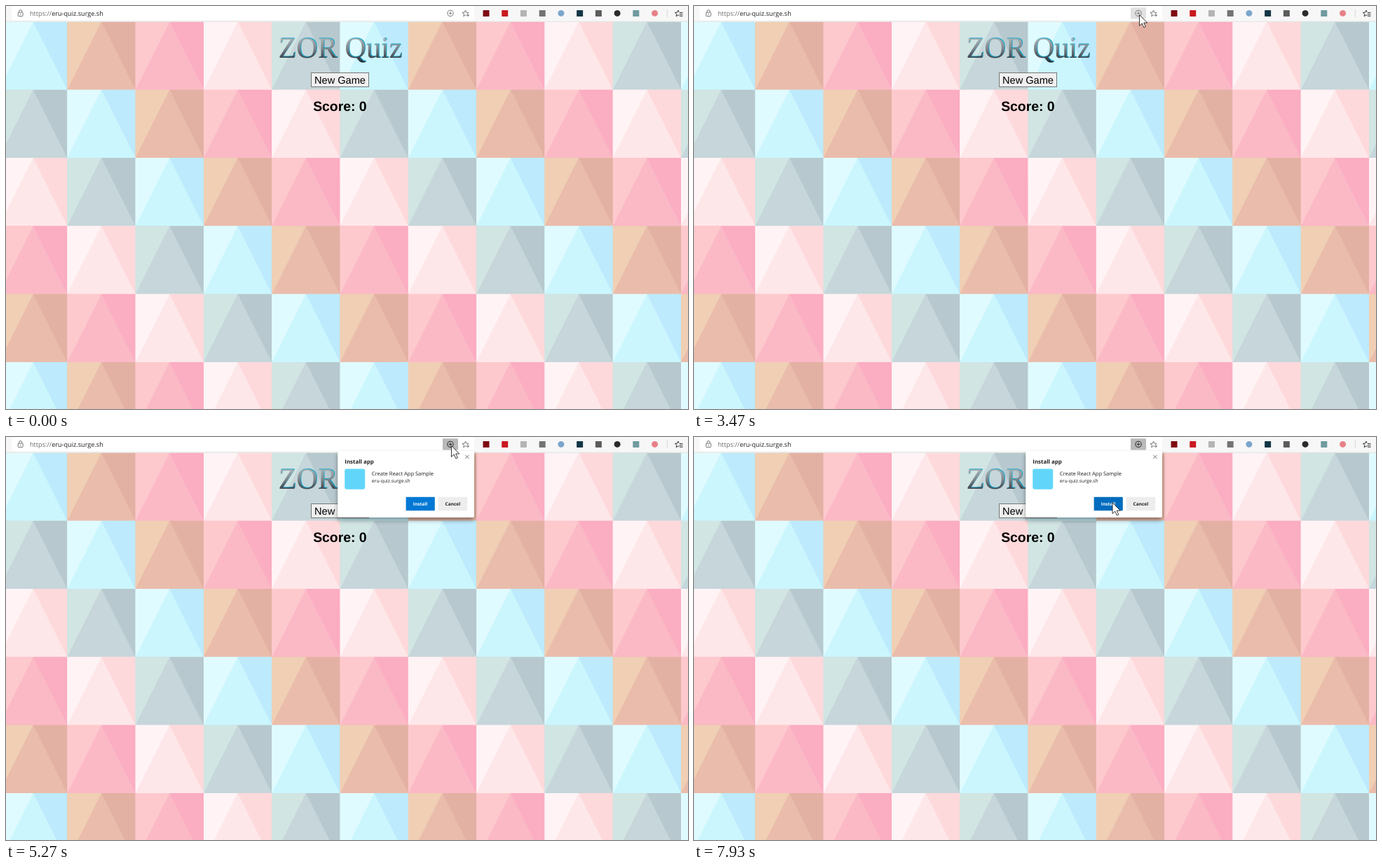
An HTML page that plays this animation: 973x576 px, repeating every 8 s.

```html
<!DOCTYPE html>
<html lang="en">
<head>
<meta charset="utf-8">
<title>Quiz</title>
<style>
  html, body { margin: 0; width: 100%; height: 100%; overflow: hidden; background: #f7f7f7; }
  svg { display: block; width: 100%; height: 100%; }
  text { text-rendering: geometricPrecision; }
  .ui { font-family: "Open Sans", "Noto Sans", sans-serif; }
  .page { font-family: "Liberation Sans", Arial, sans-serif; }
  .title { font: 42.2px "Liberation Serif", "Times New Roman", serif; }
  .line { fill: none; stroke: #666; stroke-width: .9; }
</style>
</head>
<body>
<svg viewBox="0 0 973 576" preserveAspectRatio="none">
  <defs>
    <linearGradient id="metal" gradientUnits="userSpaceOnUse" x1="0" y1="44" x2="0" y2="78">
      <stop offset="0" stop-color="#b3b8bb"/>
      <stop offset=".5" stop-color="#7b858b"/>
      <stop offset="1" stop-color="#2d333c"/>
    </linearGradient>
    <filter id="shade" x="-10%" y="-15%" width="120%" height="135%">
      <feDropShadow dx="0" dy="4" stdDeviation="3" flood-color="#000" flood-opacity=".4"/>
    </filter>
    <path id="star" d="M0-4.6 1.3-1.5 4.6-1.2 2.1.9 2.9 4.1 0 2.4-2.9 4.1-2.1.9-4.6-1.2-1.3-1.5Z"/>
  </defs>

  <g id="tiles"></g>

  <g class="title">
    <text x="389.4" y="73.4" fill="#1ba6c9">ZOR Quiz</text>
    <text x="388.4" y="74.4" fill="url(#metal)">ZOR Quiz</text>
  </g>
  <g class="page">
    <rect x="435.5" y="95.5" width="82" height="20" fill="#efefef" stroke="#767676"/>
    <text x="476.5" y="110.8" font-size="14.6" text-anchor="middle">New Game</text>
    <text x="476.4" y="150.3" font-size="19.4" font-weight="700" text-anchor="middle">Score: 0</text>
  </g>

  <g>
    <rect width="973" height="22.5" fill="#f7f7f7"/>
    <rect y="21.7" width="973" height=".8" fill="#dcdcdc"/>
    <path d="M8 0H668V17a3 3 0 0 1-3 3H11a3 3 0 0 1-3-3Z" fill="#fff"/>
    <rect class="line" x="17.3" y="9" width="6.8" height="5.6" rx=".8"/>
    <path class="line" d="M18.7 9V7.5a2 2 0 0 1 4 0V9"/>
    <circle cx="20.7" cy="11.8" r=".7" fill="#666"/>
    <text class="ui" x="34" y="14" font-size="9.15" fill="#222"><tspan fill="#6a6a6a">https://</tspan>eru-quiz.surge.sh</text>

    <rect id="hover" x="623" y="2.2" width="22" height="16.2" rx="1"/>
    <g id="plus" fill="none">
      <circle cx="634" cy="10.4" r="4.1"/>
      <path d="M632 10.4h4M634 8.4v4"/>
    </g>
    <use href="#star" class="line" x="655.5" y="10.6"/>
    <path d="M656.3 13.2h5M658.8 10.7v5" stroke="#fff" stroke-width="2.4"/>
    <path class="line" d="M657 13.2h4M659 11.2v4"/>
    <g id="badges"></g>
    <path d="M943.3 5v11" stroke="#d0d0d0" stroke-width=".8"/>
    <use href="#star" x="959" y="10.6" fill="none" stroke="#222" stroke-width=".9"/>
    <path d="M960 9.6h6M960 12h6M960 14.3h6" stroke="#f7f7f7" stroke-width="2.2"/>
    <path d="M961 9.6h4.6M960.5 12h5M961 14.3h4.6" stroke="#222" stroke-width=".9"/>
  </g>

  <g id="popup" class="ui" fill="#222">
    <rect x="473.3" y="20" width="194.7" height="95" rx="2" fill="#fff" filter="url(#shade)"/>
    <text x="483.3" y="37.6" font-size="7.9" font-weight="700">Install app</text>
    <path d="M655.2 25.7l5.4 5.4M660.6 25.7l-5.4 5.4" stroke="#555" stroke-width=".8"/>
    <rect x="483.2" y="45.5" width="29" height="29.3" rx="3" fill="#61d6fa"/>
    <text x="521.8" y="54.6" font-size="7.54">Create React App Sample</text>
    <text x="521.8" y="64.6" font-size="6.8">eru-quiz.surge.sh</text>
    <g font-size="6.55" font-weight="700" text-anchor="middle">
      <rect id="install" x="570.6" y="85.7" width="41.2" height="19.5" rx="1"/>
      <text x="591" y="97.8" fill="#fff">Install</text>
      <rect x="616.7" y="85.7" width="41.5" height="19.5" rx="1" fill="#ededed"/>
      <text x="637.4" y="97.8">Cancel</text>
    </g>
  </g>

  <path id="cursor" d="M0 0V15.8L3.7 12.4 6.3 18.3 8.8 17.2 6.2 11.5H11.2Z" fill="#fff" stroke="#222" stroke-width=".9"/>
</svg>

<script>
const LOOP = 8000, FRAME = 1000 / 15;
const $ = id => document.getElementById(id);

function add(parent, name, attrs) {
  const el = document.createElementNS('http://www.w3.org/2000/svg', name);
  for (const key in attrs) el.setAttribute(key, attrs[key]);
  parent.append(el);
}

// Wallpaper: five colourways (left, centre, right) running along diagonals
const shades = [
  '#e0fbff #cbf6fe #bdeafc',
  '#f0cfb4 #eabcab #e3b1a3',
  '#fdc9cd #fbb9c6 #fbadc2',
  '#fff3f5 #fee7e9 #fed9db',
  '#d1e5e3 #c6d6da #b7c9ce'
].map(set => set.split(' '));
const size = 97.3;
for (let row = 0; row < 6; row++) {
  for (let col = 0; col < 11; col++) {
    const x = 476.6 + (col - 5) * size, y = 22.5 + row * size;
    const [left, mid, right] = shades[(col - row + 10) % 5];
    const end = x + size, apex = x + size / 2, low = y + size;
    add($('tiles'), 'rect', { x, y, width: size + .5, height: size + .5, fill: mid });
    add($('tiles'), 'path', { d: `M${x} ${y}H${apex}L${x} ${low}Z`, fill: left });
    add($('tiles'), 'path', { d: `M${apex} ${y}H${end}V${low}Z`, fill: right });
  }
}

// Evenly spaced toolbar badges; "o" marks the round ones
'#7f0a14 #c8191f #b4b4b4 #737373 #7ba6cc,o #123646 #5c5c5c #2b2b2b,o #6f9ba0 #e78088,o'
  .split(' ').forEach((badge, i) => {
    const [fill, round] = badge.split(',');
    add($('badges'), 'rect', {
      x: 680.5 + i * 26.73, y: 5.9, width: 9, height: 9, rx: round ? 4.5 : .5, fill
    });
  });

const clamp = k => Math.min(1, Math.max(0, k));
const smooth = k => k * k * (3 - 2 * k);
const easeOut = k => 1 - (1 - k) ** 2;

// Pointer strokes: each glides from where the last one ended, bowed sideways by bend
const strokes = [
  { from: 200, to: 470, x: 587, y: 322, ease: easeOut },
  { from: 1530, to: 2530, x: 634.5, y: 12.5, bend: 70 },
  { from: 2870, to: 3470, x: 635.5, y: 12.5 },
  { from: 5400, to: 6400, x: 508.5, y: 42, bend: 12 },
  { from: 6400, to: 6800, x: 489, y: 40 },
  { from: 6800, to: 7330, x: 587, y: 88 },
  { from: 7400, to: 7930, x: 597, y: 93.7 }
];

function pointerAt(t) {
  let x = 927, y = 537;
  for (const s of strokes) {
    if (t <= s.from) break;
    const k = (s.ease || smooth)(clamp((t - s.from) / (s.to - s.from)));
    const bow = (s.bend || 0) * 2 * k * (1 - k);
    x += (s.x - x) * k + bow;
    y += (s.y - y) * k + bow / 3;
  }
  return [x, y];
}

function draw(ms) {
  const t = Math.floor((ms % LOOP + 4) / FRAME) * FRAME;
  const [x, y] = pointerAt(t);
  const shown = smooth(clamp((t - 5100) / 170));
  const pressed = t >= 4130;

  $('cursor').setAttribute('transform', `translate(${x} ${y})`);
  $('cursor').setAttribute('visibility', t >= 199 ? 'visible' : 'hidden');
  $('hover').setAttribute('fill', pressed ? '#b9b9b9' : t >= 2465 ? '#e1e1e1' : 'none');
  $('plus').setAttribute('stroke', pressed ? '#222' : '#777');
  $('popup').setAttribute('opacity', shown);
  $('popup').setAttribute('transform',
    `translate(570.6 67.5) scale(${.945 + .055 * shown}) translate(-570.6 -67.5)`);
  $('install').setAttribute('fill', t >= 7260 ? '#006cbe' : '#0078d4');
}

const start = performance.now();
function tick() {
  draw(performance.now() - start);
  requestAnimationFrame(tick);
}
tick();
</script>
</body>
</html>
```
